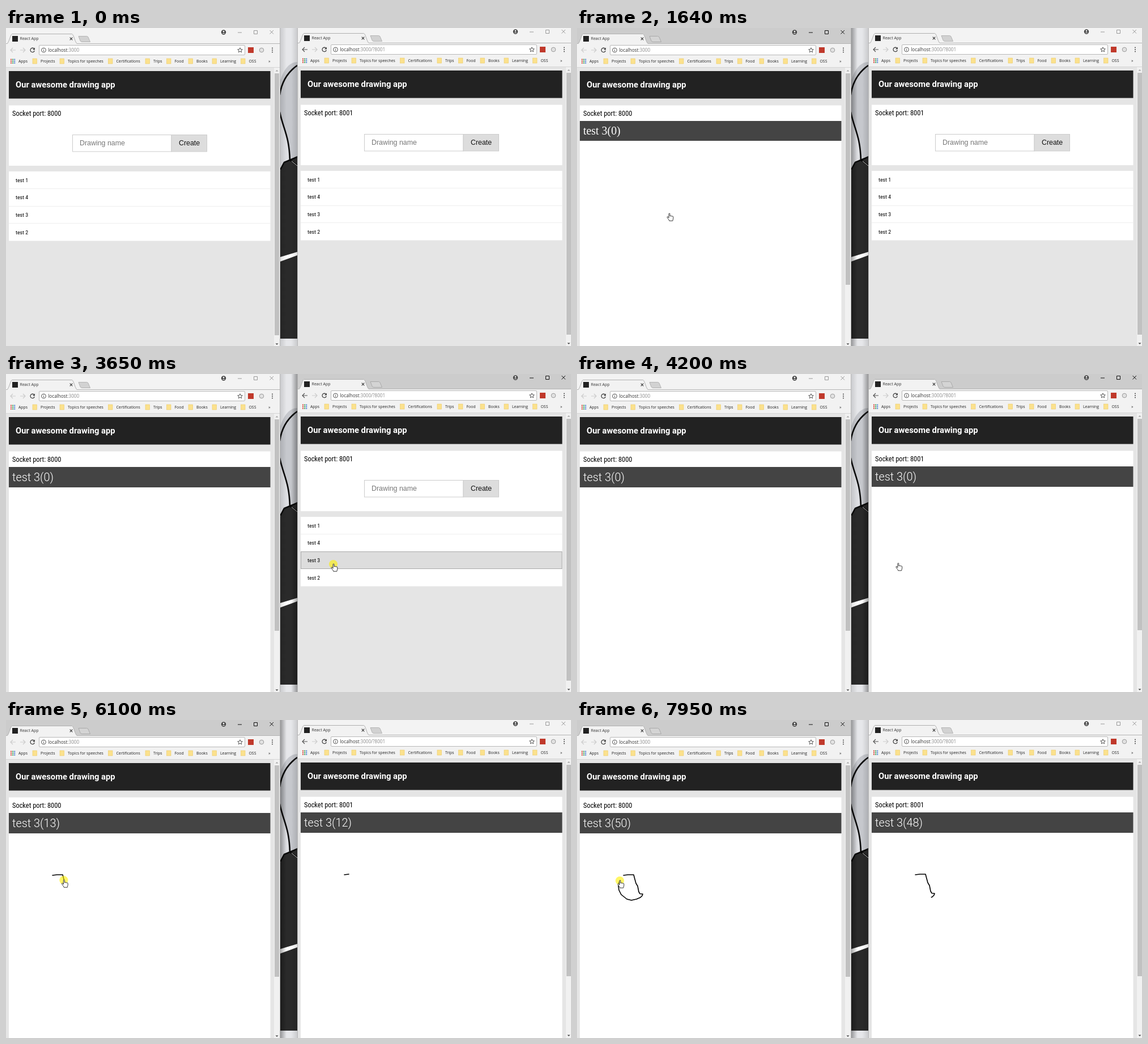
These frames come from a looping animation (997 px wide and 561 px high, 8000 ms). An HTML page:

```html
<!DOCTYPE html>
<html lang="en">
<head>
<meta charset="utf-8">
<title>Drawing app</title>
<style>
html, body { margin: 0; width: 100%; height: 100%; overflow: hidden; background: #e5e5e5; }
svg { display: block; width: 997px; height: 561px; }
text { white-space: pre; }
.ui { font-family: "Open Sans", "Noto Sans", sans-serif; fill: #333; }
.tabname { font-size: 7.1px; }
.url { font-size: 8.15px; }
.mark { font-size: 6.9px; fill: #222; }
.head { font: bold 14.75px Roboto, sans-serif; fill: #fff; }
.cond { font-family: "Roboto Condensed", Roboto, sans-serif; font-stretch: 75%; fill: #000; }
.wide .cond { letter-spacing: -.03em; }
.port { font-size: 12.4px; }
.item { font-size: 9.9px; }
.wide .port { font-size: 11.8px; }
.wide .item { font-size: 9.4px; }
.form { font: 12.4px "Liberation Sans", Arial, sans-serif; }
.title { font: 300 19.9px Roboto, sans-serif; fill: #fff; }
.title.serif { font: 19.9px "Liberation Serif", serif; }
.bar { fill: #f3f3f3; }
.on .bar { fill: #ccc; }
.ctl { fill: none; stroke: #999; }
.on .ctl { stroke: #111; }
.plus { fill: #d2d2d2; stroke: #b4b4b4; }
.on .plus { fill: #d4d4d4; stroke: #aaa; }
.shade { opacity: .35; }
.on .shade { opacity: 1; }
.ink { fill: none; stroke: #000; stroke-width: 1.6; stroke-linejoin: round; stroke-linecap: round; }
</style>
</head>
<body>
<svg id="stage" viewBox="0 0 997 561"></svg>
<script>
const LOOP = 8000;
const stage = document.getElementById('stage');

const rect = (x, y, w, h, fill, more = '') =>
  `<rect x="${x}" y="${y}" width="${w}" height="${h}" fill="${fill}" ${more}/>`;
const text = (x, y, cls, str) => `<text x="${x}" y="${y}" class="${cls}">${str}</text>`;
const line = (d, color, width = 1, more = '') =>
  `<path d="${d}" fill="none" stroke="${color}" stroke-width="${width}" ${more}/>`;

const BOOKMARKS = [
  [47, 'Projects'], [95, 'Topics for speeches'], [180.5, 'Certifications'], [246, 'Trips'],
  [283.5, 'Food'], [322, 'Books'], [364, 'Learning'], [414.5, 'OSS']
];
const ITEMS = ['test 1', 'test 4', 'test 3', 'test 2'];
const ROW = 30.8, LIST_TOP = 253;

function titleBar() {
  return `<rect class="bar" x="-1" y="-1" width="485" height="30"/>` +
    line('M-1 27.5H484', '#b4b4b4') +
    `<path d="M1.5 28C5 27 8 11 10.500 10.500H116.500C119.500 11 122 27 126 28" fill="#f2f2f2" stroke="#b0b0b0"/>` +
    rect(2, 28, 123, 1, '#f2f2f2') +
    rect(11, 14, 10, 10, '#222') +
    text(24.5, 21.4, 'ui tabname', 'React App') +
    line('M112.700 16.700l4.600 4.600m0-4.600l-4.600 4.600', '#333', 1.1) +
    `<path class="plus" d="M128 14.500H142.500Q144 14.500 145 16L148.500 24.500H134Q132 24.500 131 22.500Z"/>` +
    `<circle cx="384" cy="7.500" r="4.200" fill="#444"/><circle cx="384" cy="6.200" r="1.400" fill="#f2f2f2"/>` +
    `<path d="M381.400 10q2.600-2.600 5.200 0z" fill="#f2f2f2"/>` +
    `<path class="ctl" d="M409 8H416M437.500 4.500H443.500V10.500H437.500ZM465.500 4l6.500 6.500m0-6.500l-6.500 6.500"/>`;
}

function toolbar(path, canGoBack) {
  const arrow = 'm4-4l-4 4l4 4m-4-4h9';
  let s = rect(-1, 28, 485, 42, '#f2f2f2') +
    line('M8 39' + arrow, canGoBack ? '#555' : '#ccc', 1.2) +
    line('M8 39' + arrow, '#ccc', 1.2, 'transform="translate(42 0) scale(-1 1)"') +
    line('M49.500 36.500A3.700 3.700 0 1 0 50.300 40', '#444', 1.3) +
    `<path d="M51 34.500V38.500H47Z" fill="#444"/>` +
    rect(58.5, 30.5, 363, 17, '#fff', 'stroke="#b8b8b8" rx="1.500"') +
    `<circle cx="66.500" cy="39" r="3.900" fill="none" stroke="#555"/>` +
    line('M66.500 38.500V41.300M66.500 36.500V37.500', '#555') +
    `<text x="74.300" y="41.900" class="ui url">localhost<tspan fill="#888">${path}</tspan></text>` +
    `<path d="M413 34.800l1.200 2.900 3.100.2-2.400 2 .8 3-2.700-1.700-2.700 1.700.8-3-2.400-2 3.100-.2z" fill="none" stroke="#444" stroke-width=".9"/>` +
    rect(427, 34, 10, 10, '#c0392b') +
    `<circle cx="451" cy="39" r="3.800" fill="#e2e2e2" stroke="#999"/>` +
    [35.5, 39, 42.5].map(y => `<circle cx="470" cy="${y}" r="1" fill="#444"/>`).join('');
  const dots = ['#d9483b', '#3c9d55', '#4a7fd6', '#e2a92f'];
  for (let i = 0; i < 9; i++)
    s += rect(8 + i % 3 * 3.1, 54.5 + Math.floor(i / 3) * 3.1, 2, 2, dots[(i + Math.floor(i / 3)) % 4]);
  s += text(22, 61, 'ui mark', 'Apps');
  for (const [x, name] of BOOKMARKS)
    s += rect(x, 54, 7.5, 9, '#fbe18d', 'stroke="#ecc965" stroke-width=".6"') +
      text(x + 14, 61, 'ui mark', name);
  return s + text(463, 61, 'ui tabname', '»') + line('M-1 69.500H484', '#d5d5d5');
}

function listPage() {
  let s = rect(5, 136.5, 461.5, 106.5, '#fff') +
    rect(117.5, 188.5, 174.5, 29.5, '#fff', 'stroke="#ccc"') +
    rect(292, 188.5, 62.5, 29.5, '#ddd', 'stroke="#ccc"') +
    `<text x="130" y="207.200" class="form" fill="#777">Drawing name</text>` +
    `<text x="305" y="207.200" class="form" fill="#111">Create</text>` +
    rect(5, LIST_TOP, 461.5, ROW * 4 - .7, '#fff');
  for (let i = 1; i < 4; i++) s += rect(5, Math.round(LIST_TOP + ROW * i) - 1, 461.5, 1, '#eee');
  s += `<g class="hover">${rect(5.5, 314.5, 460.5, 30, '#ddd', 'stroke="#aaa"')}</g>`;
  ITEMS.forEach((name, i) => s += text(17, 271.6 + ROW * i, 'cond item', name));
  return s;
}

function drawPage() {
  return rect(5, 136.5, 461.5, 430, '#fff') +
    `<rect class="strip" x="5" y="164" width="461.500" height="36" fill="#444"/>` +
    text(11, 189, 'title', '') + `<path class="ink"/>`;
}

function browser(id, x, y, path, canGoBack, shadeX) {
  return `<g id="${id}" transform="translate(${x} ${y})">` +
    rect(shadeX, 0, 11, 562, `url(#${id}Shade)`, 'class="shade"') +
    rect(-1, -1, 485, 570, '#e5e5e5') + titleBar() + toolbar(path, canGoBack) +
    rect(5, 76, 461.5, 48.5, '#222') + text(17, 105.3, 'head', 'Our awesome drawing app') +
    `<g class="list">${listPage()}</g><g class="draw">${drawPage()}</g>` +
    text(11, 154.5, 'cond port', 'Socket port: ' + (canGoBack ? 8001 : 8000)) +
    rect(473, 70, 10.5, 500, '#f1f1f1') +
    `<rect class="thumb" x="474" y="80" width="8" height="462" fill="#c1c1c1"/>` +
    `<path d="M475.500 76.500h5l-2.500-2.500z" fill="#a3a3a3"/><path d="M475.500 556.500h5l-2.500 2.500z" fill="#444"/>` +
    line('M483.500 0V570M-.5 0V570', '#aaa', .8) + `</g>`;
}

function wallpaper() {
  return rect(480, 0, 40, 561, '#e6e7ea') +
    `<path d="M514 60Q495 60 484 92V156Q497 185 501 233L514 228Z" fill="#c6c8cd"/>` +
    `<path d="M484 156Q497 185 501 233L484 245Z" fill="#dedfe3"/>` +
    line('M514 66Q488 84 483 118M483 148C489 178 500 190 501 235', '#0a0a0a', 2.6) +
    `<path d="M484 251L492 237L514 228V548H484Z" fill="#2a2a2a"/>` +
    line('M484 250L491 237L515 227M501 233L514 242', '#080808', 2.6) +
    line('M504 235L514 243', '#ddd', 1) +
    `<path d="M484 404L514 395V401L484 412Z" fill="#fff"/>`;
}

const fade = (id, from, to) =>
  `<linearGradient id="${id}"><stop offset="0" stop-opacity="${from}"/><stop offset="1" stop-opacity="${to}"/></linearGradient>`;

stage.innerHTML = `<defs>${fade('leftShade', .35, 0)}${fade('rightShade', 0, .35)}</defs>` +
  wallpaper() +
  browser('right', 515, -1, ':3000/?8001', true, -12) +
  browser('left', 0, 0, ':3000', false, 484) +
  `<g id="cursor"><circle id="glow" cx="-.5" cy=".5" r="7.600" fill="#fff000" fill-opacity=".6"/>
    <path id="hand" fill="#fff" stroke="#222" stroke-width=".9" stroke-linejoin="round"
      d="M-1 1c0-1.400 2-1.400 2 0v4c.2-1 1.900-1 2 .2c.3-1 1.900-.8 2 .3c.4-.8 1.800-.5 1.800.7v3c0 1.500-1 2.300-1 4h-6c0-1.600-1.600-2.400-3.600-6c-.6-1.200.8-2 1.600-1L-1 8z"/>
    <path id="arrow" fill="#fff" stroke="#222" stroke-width=".8" d="M0 0V11L2.600 8.600 4.400 12.600 6 11.900 4.300 8H7.800Z"/></g>`;

// Without a condensed Roboto, tighten the regular width.
const port = stage.querySelector('.port');
if (port.getComputedTextLength() > 92) stage.classList.add('wide');

// x, y, time on the left, time on the right
const STROKE = [
  [82, 274, 5450, 5700], [90, 273, 5650, 6100], [100, 273, 5900, 6550], [101, 277, 6000, 6620],
  [104, 288, 6220, 6800], [107, 293, 6330, 6950], [109, 303, 6480, 7300], [111, 306.5, 6560, 7400],
  [116, 307, 6700, 7640], [115, 310, 6790, 7850], [112, 313, 6850, 7920], [105, 316, 6950, 8050],
  [96, 318, 7100, 9000], [88, 316, 7230, 9000], [78, 308, 7400, 9000], [74, 300, 7530, 9000],
  [73, 293, 7680, 9000], [74, 287, 7830, 9000], [76, 283, 7950, 9000]
];
// start, end, target x, target y
const MOVES = [
  [70, 860, 170, 358], [870, 1100, 163, 327], [1950, 2790, 554, 336],
  [2830, 3030, 578, 335], [4130, 4870, 82, 275]
];
const PRESSES = [[1500, 1640], [3650, 3800], [5180, LOOP]];

const mix = (a, b, k) => a + (b - a) * k;
const ease = k => (1 - Math.cos(Math.PI * k)) / 2;
const within = (t, [a, b]) => t >= a && t < b;
const show = (el, on) => el.style.display = on ? '' : 'none';

// Points of the stroke drawn by time t; col picks the time column.
function drawn(t, col) {
  const pts = [];
  for (let i = 0; i < STROKE.length; i++) {
    const p = STROKE[i];
    if (p[col] <= t) { pts.push([p[0], p[1]]); continue; }
    if (i) {
      const q = STROKE[i - 1], k = (t - q[col]) / (p[col] - q[col]);
      pts.push([mix(q[0], p[0], k), mix(q[1], p[1], k)]);
    }
    break;
  }
  return pts;
}

function pointer(t) {
  const pts = drawn(t, 2);
  if (pts.length) return pts[pts.length - 1];
  let x = 786, y = 529;
  for (const [a, b, tx, ty] of MOVES) {
    const k = ease(Math.min(1, Math.max(0, (t - a) / (b - a))));
    x = mix(x, tx, k);
    y = mix(y, ty, k);
  }
  return [x, y];
}

function view(id) {
  const root = document.getElementById(id);
  const find = cls => root.querySelector('.' + cls);
  return {
    root, list: find('list'), draw: find('draw'), hover: find('hover'), title: find('title'),
    strip: find('strip'), ink: find('ink'), thumb: find('thumb')
  };
}
const left = view('left'), right = view('right');
const [cursor, glow, hand, arrow] = ['cursor', 'glow', 'hand', 'arrow'].map(id => document.getElementById(id));

function paint(v, { active, hover, open, serif, count, pts }) {
  v.root.setAttribute('class', active ? 'on' : '');
  show(v.list, !open);
  show(v.draw, open);
  show(v.hover, hover);
  v.title.textContent = `test 3(${count})`;
  v.title.setAttribute('class', serif ? 'title serif' : 'title');
  v.title.setAttribute('y', serif ? 188 : 189);
  v.strip.setAttribute('height', serif ? 35 : 36);
  v.thumb.setAttribute('height', open ? 373 : 462);
  v.ink.setAttribute('d', pts.length > 1 ? 'M' + pts.join('L') : '');
}

function render(t) {
  paint(left, {
    active: within(t, [1500, 3650]) || t >= 5180,
    hover: within(t, PRESSES[0]),
    open: t >= 1640,
    serif: t < 1710,
    count: Math.max(0, Math.floor((t - 5445) / 50)),
    pts: drawn(t, 2)
  });
  paint(right, {
    active: within(t, [3650, 5180]),
    hover: within(t, PRESSES[1]),
    open: t >= 3800,
    serif: false,
    count: Math.max(0, Math.floor((t - 5430) / 52)),
    pts: drawn(t, 3)
  });
  const [x, y] = pointer(t);
  const overLink = y < 375 && (x < 467 || x > 520);
  cursor.setAttribute('transform', `translate(${x} ${y})`);
  show(cursor, t >= 70);
  show(glow, PRESSES.some(p => within(t, p)));
  show(hand, overLink);
  show(arrow, !overLink);
}

const start = performance.now();
function tick() {
  render((performance.now() - start) % LOOP);
  requestAnimationFrame(tick);
}
tick();
</script>
</body>
</html>
```
